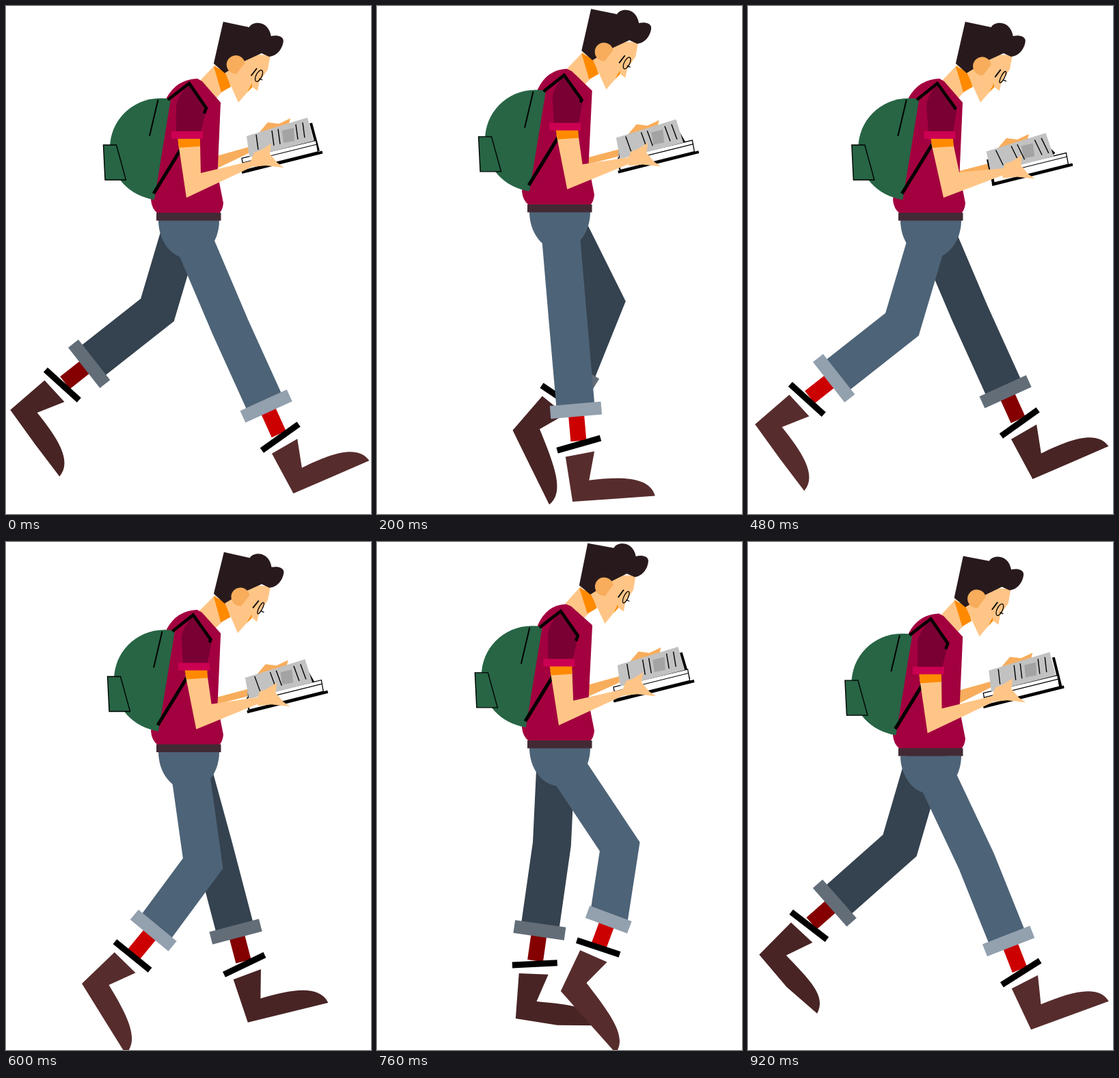
Recreate the animation shown at these times as an HTML page with a canvas. Size 534x742 px, loop 0.96 s.

```html
<!DOCTYPE html>
<html lang="en">
<head>
<meta charset="utf-8">
<title>Walking reader</title>
<style>
html, body { margin: 0; width: 100%; height: 100%; overflow: hidden; background: #fff; }
canvas { display: block; }
</style>
</head>
<body>
<canvas id="stage" width="534" height="742"></canvas>
<script>
const ctx = document.getElementById('stage').getContext('2d');
const LOOP = 960, STEP = 40, TAU = Math.PI * 2, DEG = Math.PI / 180;

const SKIN = '#ffc586', SHADE = '#f8ad5c', ORANGE = '#ff8a00', HAIR = '#281a1c',
  SHIRT = '#a3003f', SLEEVE = '#7a0033', TRIM = '#cc0052', BELT = '#422a35', BAG = '#276545';
const NEAR = { jeans: '#4d6377', cuff: '#93a0ae', sock: '#cc0000', shoe: '#572c2d' };
const FAR = { jeans: '#35424f', cuff: '#626d78', sock: '#850000', shoe: '#482425' };

// Timing: a cosine, a one-sided pulse, and angles as sums of harmonics
const wave = (t, peak, period = LOOP) => Math.cos(TAU * (t - peak) / period);
const pulse = (t, peak, power) => Math.max(0, wave(t, peak)) ** power;
const bobAt = t => -6.5 * (1 - wave(t, 0, LOOP / 2));

function thighAngle(t) {
  const a = TAU * t / LOOP;
  return DEG * (5.2 + 18.5 * Math.cos(a) - 13.9 * Math.sin(a) - 6.4 * Math.cos(2 * a)
    + 1.4 * Math.cos(3 * a) + 2.1 * Math.sin(3 * a) - 0.9 * Math.cos(4 * a));
}
function shinAngle(t) {
  const a = TAU * t / LOOP;
  return DEG * (-10.9 + 34.7 * Math.cos(a) + 6.2 * Math.sin(a) - 2.8 * Math.cos(2 * a)
    + 3.4 * Math.cos(3 * a) - 1.3 * Math.sin(3 * a));
}

function trace(p, closed) {
  ctx.beginPath();
  for (let i = 0; i < p.length; i += 2) ctx.lineTo(p[i], p[i + 1]);
  if (closed) ctx.closePath();
}
function fill(color, ...p) {
  trace(p, true);
  ctx.fillStyle = color;
  ctx.fill();
}
function line(width, p, color = '#000', closed = false) {
  trace(p, closed);
  ctx.strokeStyle = color;
  ctx.lineWidth = width;
  ctx.stroke();
}
function shape(color, d) {
  ctx.fillStyle = color;
  ctx.fill(new Path2D(d));
}
function bar(color, width, height) {
  ctx.fillStyle = color;
  ctx.fillRect(-width / 2, -height / 2, width, height);
}
function placed(x, y, angle, draw) {
  ctx.save();
  ctx.translate(x, y);
  ctx.rotate(angle);
  draw();
  ctx.restore();
}
// Angles are measured from straight down, forward being positive
const reach = (x, y, length, angle) => [x + length * Math.sin(angle), y + length * Math.cos(angle)];

// The sole droops about the heel, then the toe bends about the ball
function foot(color, droop, bend) {
  const heel = new DOMMatrix().translate(-15, 83).rotate(droop);
  const ball = heel.translate(62, 0).rotate(bend);
  const at = (m, x, y) => {
    const p = m.transformPoint({ x, y });
    return [p.x, p.y];
  };
  ctx.beginPath();
  ctx.moveTo(-20.7, 17);
  ctx.lineTo(22, 12);
  ctx.lineTo(11.3, 53.5);
  ctx.bezierCurveTo(...at(heel, 73, -32), ...at(ball, 53, -29), ...at(ball, 59, 0));
  ctx.lineTo(...at(ball, 0, 0));
  ctx.lineTo(-15, 83);
  ctx.fillStyle = color;
  ctx.fill();
  placed(0, 0, -12 * DEG, () => bar('#000', 66, 9));
}

function leg(t, bob, colors) {
  const lift = pulse(t, 735, 3);
  const shin = shinAngle(t), ankle = shin - 12 * DEG * lift;
  const hipY = 325 + bob;
  const knee = reach(282, hipY, 151, thighAngle(t));
  const cuff = reach(...knee, 127 - 20 * lift, shin);
  const band = reach(...cuff, 50 - 7 * lift, ankle);
  line(23, [...cuff, ...reach(...cuff, 45, ankle)], colors.sock);
  line(56, [267, hipY, ...knee, ...cuff], colors.jeans);
  placed(...cuff, -ankle, () => bar(colors.cuff, 75 - 10 * lift, 19));
  placed(...band, (1 + 13 * pulse(t, 670, 2)) * DEG - ankle, () =>
    foot(colors.shoe, 20 * pulse(t, 720, 3), -32 * pulse(t, 360, 9)));
}

function head(turn) {
  fill(SKIN, 283, 110, 306, 86, 326, 110, 316, 126, 304, 138);
  fill(ORANGE, 304, 88, 322, 96, 329, 118, 315, 126);
  shape(SKIN, 'M320 96 L340 141 L360 118 L368 124 L371 110 L383 93 L387 72 L340 70 Z');
  fill(ORANGE, 353, 126, 360, 113, 360, 119);
  shape(HAIR, 'M318 23 L356 31 C360 22 384 20 388 44 C396 42 406 44 406 51 C405 64 395 74 385 74 L374 69 L348 81 L320 98 L304 84 Z');

  placed(7 * turn, 2.5 * turn, 0, () => {
    ctx.beginPath();
    ctx.arc(336, 85.5, 13.5, 85 * DEG, 350 * DEG);
    ctx.fillStyle = SHADE;
    ctx.fill();
  });
  placed(3 * turn, 2 * turn, 0, () => {
    line(1.8, [358.5, 102, 367, 91]);
    ctx.beginPath();
    ctx.ellipse(370, 102, 4.2 - 1.7 * turn, 9.2, 27 * DEG, 0, TAU);
    ctx.lineWidth = 1.3;
    ctx.stroke();
    line(1.3, [370, 106, 375, 108]);
  });
}

function torso(lean) {
  ctx.beginPath();
  ctx.moveTo(235, 134);
  ctx.quadraticCurveTo(250 - 2 * lean, 107 - 3 * lean, 280 - 3 * lean, 106 - 3 * lean);
  ctx.lineTo(287 - 3 * lean, 110 - 4 * lean);
  ctx.lineTo(314 + lean, 141 - 7 * lean);
  ctx.lineTo(309.5, 245);
  ctx.lineTo(318, 288);
  ctx.quadraticCurveTo(317, 298, 312, 303);
  ctx.lineTo(222, 303);
  ctx.quadraticCurveTo(213, 296, 212, 283);
  ctx.fillStyle = SHIRT;
  ctx.fill();
  placed(267.25, 307.75, 0, () => bar(BELT, 94.5, 11.5));
}

function backpack() {
  const pocket = [142.5, 203, 161.5, 203, 175.5, 254, 145, 254];
  shape(BAG, 'M241 136 C190 127 152 165 152 207 C152 250 181 277 217 283 Z');
  fill(BAG, ...pocket);
  line(1.4, pocket, '#000', true);
  line(2, [222.5, 137, 210, 190]);
  line(5, [216, 274, 262, 199]);
}

function book(k) {
  placed(-5 * k, 23 * k, 0, () =>
    shape(SHADE, 'M366 190 L383 170 L399 172 L416 164 L414 172 L402 182 L375 196 Z'));

  // Cover edges show beside the lifted page as the book tilts
  line(4, [446 - 14 * k, 171 + 29 * k, 457 - 9 * k, 212 + 4 * k]);
  line(4, [364 - 13 * k, 205 + 19 * k, 350 + 9 * k, 238 + 21 * k]);

  placed(12 * k, 18 * k, 0, () => {
    const pages = [345, 222.5, 453.5, 196.5, 456.5, 213, 348, 240];
    line(4, [345, 243, 463, 213.5]);
    fill('#fff', ...pages);
    line(1.3, pages, '#000', true);
    line(1.2, [346, 229, 455, 202]);
  });

  ctx.save();
  ctx.transform(1, 0, 0.08 * k, 1, -18.5 * k, 22.5 * k);
  fill('#c2c2c2', 352, 190, 441, 163, 450, 197, 356, 221);
  fill('#a3a3a3', 404, 182, 421, 178, 422, 197, 406, 200);
  for (const x of [366, 389, 398, 424, 434]) {
    const y = 188 - (x - 366) * 0.26;
    line(1.4, [x, y, x + 3 + 6 * k, y + 22]);
  }
  ctx.restore();
}

function nearArm(k) {
  fill(SKIN, 252 + 16 * k, 200, 284 + 16 * k, 200, 285 + 24 * k, 244 - k,
    360 + 13 * k, 226 + 11 * k, 360 + 16 * k, 235 + 11 * k, 264 + 22 * k, 280);
  placed(13 * k, 16.5 * k, 0, () =>
    shape(SKIN, 'M358 227 L363 214 L372 211 L388 201 L386 216 L397 229 L407 236 L380 233 L360 235 Z'));

  // Sleeve swings from the shoulder
  ctx.save();
  ctx.transform(1, 0, 0.085 * k, 1, -0.5 * k, 0);
  fill(ORANGE, 251, 192, 284, 192, 284, 205, 253, 207);
  shape(SLEEVE, 'M268 114 L293 151 L285 184 L249 184 L249 145 Q252 130 268 114 Z');
  fill(TRIM, 242, 183, 288, 183, 288, 194, 242, 194);
  ctx.restore();
  line(4.5, [237 + 10 * k, 137, 268 + 9 * k, 113, 293 + 10 * k, 149, 290 + 12 * k, 157 - 6 * k]);
}

function draw(t) {
  const bob = bobAt(t);
  const k = 0.5 + 0.58 * wave(t, 400);
  const turn = 0.5 + 0.53 * wave(t, 560);
  const lean = 0.48 - 0.575 * wave(t, 45, LOOP / 2);
  const nod = (3 * wave(t, 100, LOOP / 2) - 1) / 118;

  ctx.fillStyle = '#fff';
  ctx.fillRect(0, 0, 534, 742);

  placed(-4, -21, 0, () => leg(t + LOOP / 2, bob, FAR));
  leg(t, bob, NEAR);

  placed(0, bob, 0, () => {
    ctx.beginPath();
    ctx.ellipse(267.5, 313, 44.5, 56, 0, 0, Math.PI);
    ctx.fillStyle = NEAR.jeans;
    ctx.fill();
    fill(SHADE, 305, 220 + 22 * k, 355 - 3 * k, 206 + 24 * k, 355 - 3 * k, 215 + 26 * k, 305, 239 + 8 * k);
    placed(340 - 6.3 * lean, 141 - 9.2 * lean, nod, () => {
      ctx.translate(-340, -141);
      head(turn);
    });
    torso(lean);
    placed(9.3 * k, 0, 0, backpack);
    book(k);
    nearArm(k);
  });
}

function tick(now) {
  draw(Math.floor((now % LOOP) / STEP) * STEP);
  requestAnimationFrame(tick);
}
draw(0);
requestAnimationFrame(tick);
</script>
</body>
</html>
```
